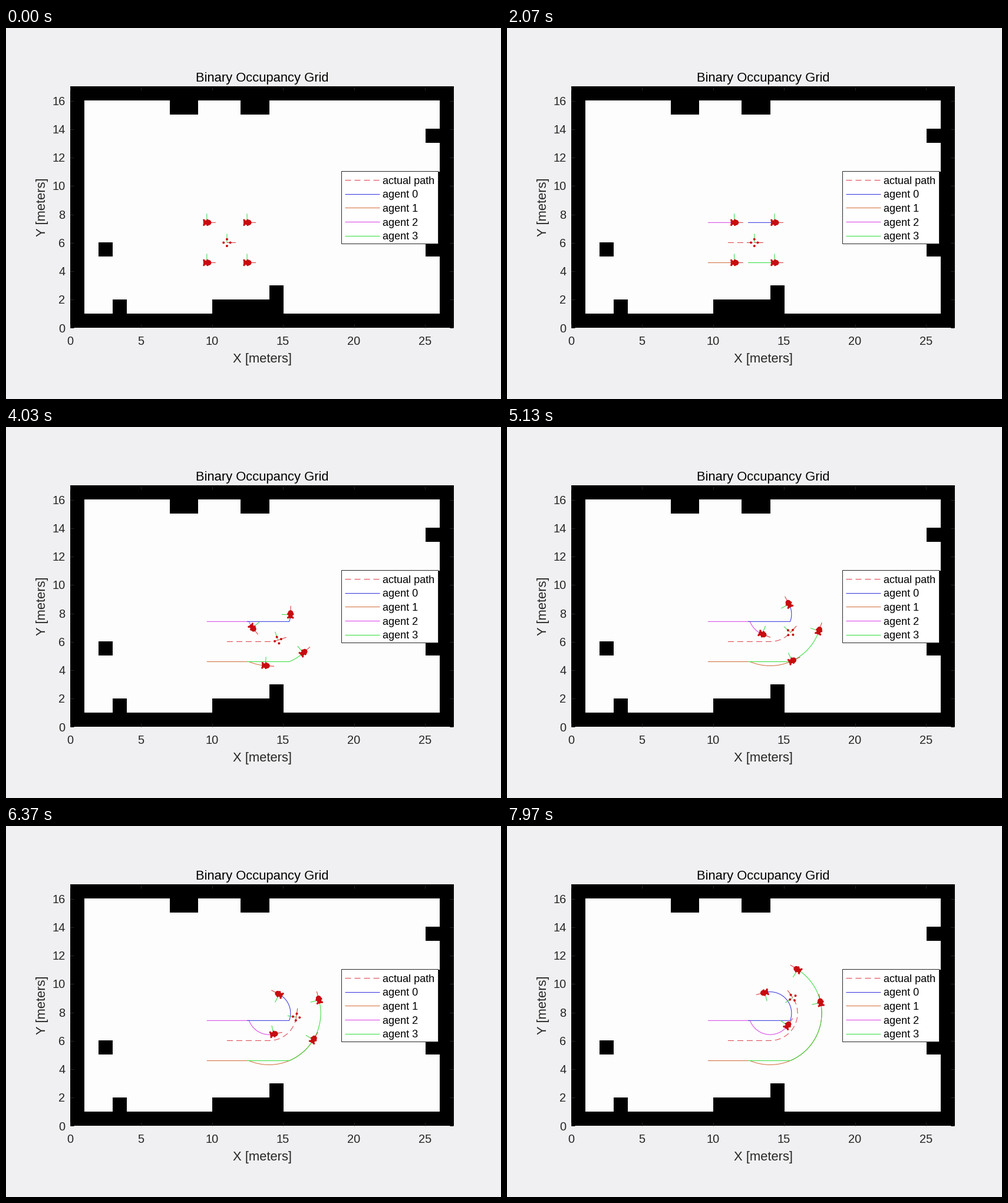
A matplotlib script for the animation above (8000 ms loop, 840 px wide and 630 px high).

```python
import numpy as np
import matplotlib.pyplot as plt
from matplotlib.animation import FuncAnimation
from matplotlib.collections import LineCollection, PolyCollection
from matplotlib.patches import Rectangle

W, H, DPI = 840, 630, 100
PX = 72 / DPI                          # one pixel in points
FRAMES, LOOP = 240, 8000
X0, Y0, CELL = 109, 508.9, 24.11       # plot origin and pixels per metre

BG, PAPER, INK = '#f0f0f2', '#fdfdfd', '#262626'
RED, AXIS_X, AXIS_Y = '#c80c10', '#d83030', '#30d840'
PATH = '#dc3c46'
AGENTS = ['#3030e0', '#d06a38', '#d83ce8', '#30dc38']

plt.rcParams['font.family'] = 'Liberation Sans'
fig = plt.figure(figsize=(W / DPI, H / DPI), dpi=DPI, facecolor=BG)
ax = fig.add_axes([0, 0, 1, 1])
ax.set_xlim(0, W)
ax.set_ylim(H, 0)
ax.axis('off')


def to_px(p):
    return np.asarray(p) * [CELL, -CELL] + [X0, Y0]


def block(x, y, w, h, color='black'):
    left, top = to_px([x, y + h])
    ax.add_patch(Rectangle((left, top), w * CELL, h * CELL, fc=color, lw=0, zorder=1))


def label(x, y, s, size, ha='center', color=INK, **kw):
    ax.text(x, y, s, size=size * PX, ha=ha, va='baseline', color=color, zorder=12, **kw)


def line(xs, ys, color, z, **kw):
    # half a pixel back, so that snapping picks the pixel the point lies in
    return ax.plot(np.subtract(xs, 0.5), np.add(ys, 0.5), color=color, lw=PX,
                   zorder=z, solid_capstyle='butt', **kw)[0]


# Occupancy grid
block(0, 0, 27, 17)
block(1, 1, 25, 15, PAPER)
for cell in [(7, 15, 2, 1), (12, 15, 2, 1), (25, 13, 1, 1), (25, 5, 1, 6),
             (2, 5, 1, 1), (3, 1, 1, 1), (10, 1, 5, 1), (14, 2, 1, 1)]:
    block(*cell)

# Ticks and labels
right, top = to_px([27, 17])
for v in range(0, 27, 5):
    x = X0 + v * CELL
    line([x, x], [Y0, Y0 - 6.5], INK, 2)
    line([x, x], [top, top + 6.5], INK, 2)
    label(x - 0.6, 538, str(v), 20)
for v in range(0, 17, 2):
    y = Y0 - v * CELL
    line([X0, X0 + 6.5], [y, y], INK, 2)
    line([right, right - 6.5], [y, y], INK, 2)
    label(100.5, y + 7.7, str(v), 20, ha='right')
label(434.5, 91.5, 'Binary Occupancy Grid', 22, color='black')
label(435, 568, 'X [meters]', 22)
label(67.5, 304, 'Y [meters]', 22, rotation=90, rotation_mode='anchor')

# Legend
DASH, ROW = (0, (10, 6)), 23.65
ax.add_patch(Rectangle((569, 243), 164, 123, fc='white', ec=INK, lw=PX, zorder=10))
names = ['actual path'] + [f'agent {k}' for k in range(4)]
for k, (name, color) in enumerate(zip(names, [PATH] + AGENTS)):
    line([575, 634], [257.6 + ROW * k] * 2, color, 11, ls='-' if k else DASH)
    label(639, 264.6 + ROW * k, name, 18, ha='left', color='black')

# Motion: straight run at constant speed, then a turn about a fixed centre
START, SPEED = np.array([11.03, 6]), 0.03
PIVOT, RADIUS = np.array([14, 7.93]), 1.93
CORNER = round((PIVOT[0] - START[0]) / SPEED)
D = np.sqrt(2)
OFFSETS = [(0, 0), (D, D), (-D, -D), (-D, D), (D, -D)]


def rotate(p, a):
    c, s = np.cos(a), np.sin(a)
    return np.asarray(p) @ np.array([[c, s], [-s, c]])


def pose(offset, i):
    if i <= CORNER:
        return START + offset + [SPEED * i, 0], 0.0
    arm = rotate(np.add(offset, [0, -RADIUS]), SPEED / RADIUS * (i - CORNER))
    return PIVOT + arm, np.arctan2(arm[1], arm[0]) + np.pi / 2


poses = [[pose(o, i) for i in range(FRAMES)] for o in OFFSETS]
tracks = [to_px([p for p, _ in track]) + [0, 0.2] for track in poses]


# Vehicle shapes in pixels, nose along +x
def disc(x, y, r):
    t = np.linspace(0, 2 * np.pi, 20, endpoint=False)
    return np.column_stack([x + r * np.cos(t), y + r * np.sin(t)])


def box(x, y, w, h):
    return np.array([(x, y), (x + w, y), (x + w, y + h), (x, y + h)])


ROVER = [box(-6, -3.8, 9, 7.6), disc(3, 0, 4.6)]
ROVER += [box(x, y, 3, 2.6) for x in (-6.5, -0.5) for y in (-5.6, 3)]
LEADER = [disc(x, y, 2) for x, y in [(5.7, 0), (-5.7, 0), (0, 5.7), (0, -5.7)]]

trails = [line([], [], PATH, 3, ls=DASH, snap=False)]
trails += [line([], [], c, z, snap=False) for c, z in zip(AGENTS, (5, 4, 4, 5))]
axes_xy = LineCollection([], linewidths=PX, colors=[AXIS_X, AXIS_Y], zorder=6, snap=False)
bodies = PolyCollection([], facecolors=RED, linewidths=0, zorder=7, snap=False)
ax.add_collection(axes_xy)
ax.add_collection(bodies)


def draw(i):
    arms, shapes = [], []
    for k, (track, trail) in enumerate(zip(tracks, trails)):
        trail.set_data(*track[:i + 1].T)
        here, a = track[i], poses[k][i][1]
        place = lambda p: here + rotate(p, a) * [1, -1]
        arms += [place([(0, 0), (15, 0)]), place([(0, 0), (0, 15)])]
        shapes += [place(s) for s in (ROVER if k else LEADER)]
    axes_xy.set_segments(arms)
    bodies.set_verts(shapes)
    return [*trails, axes_xy, bodies]


anim = FuncAnimation(fig, draw, frames=FRAMES, interval=LOOP / FRAMES,
                     init_func=lambda: draw(0), repeat=True, repeat_delay=0)
plt.show()
```
